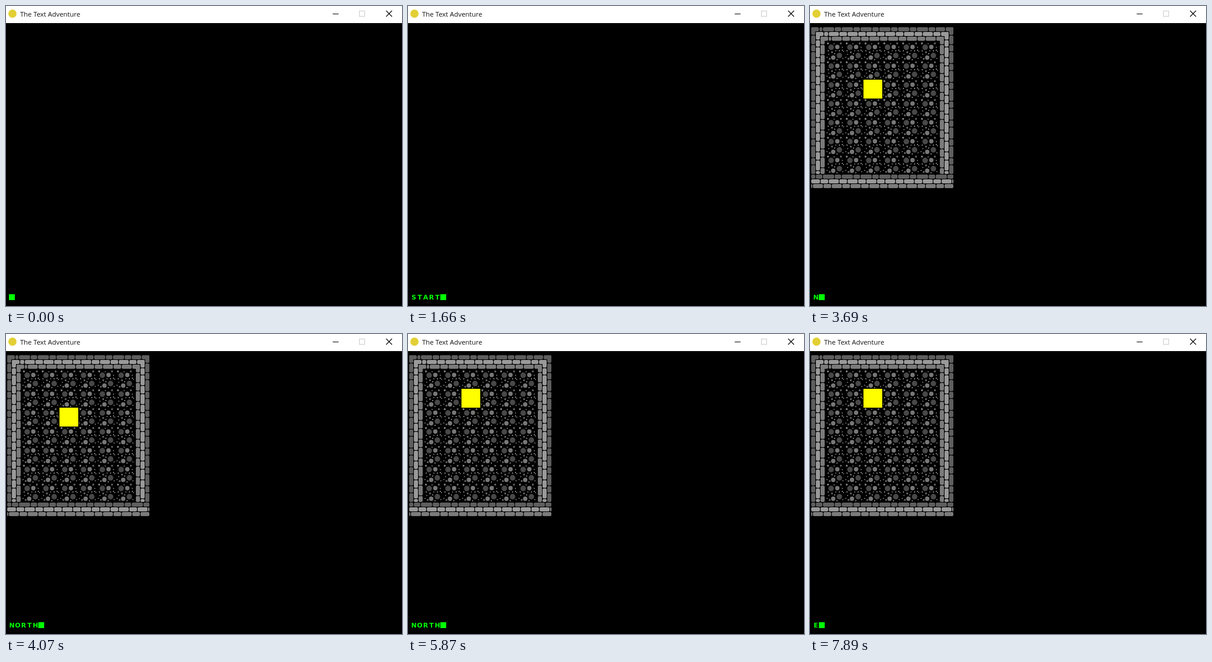
Write an HTML page that moves like this. It is 674 px wide and 509 px high and loops after 8 s.

```html
<!DOCTYPE html>
<html lang="en">
<head>
<meta charset="utf-8">
<title>The Text Adventure</title>
<style>
  html, body { margin: 0; width: 100%; height: 100%; overflow: hidden; background: #000; }
  svg { display: block; width: 674px; height: 509px; }
  .title { font: 11.4px "Open Sans", "Noto Sans", sans-serif; fill: #111; }
  .prompt { font: bold 11px "DejaVu Sans", sans-serif; fill: #0f0; text-anchor: middle; }
</style>
</head>
<body>
<svg viewBox="0 0 674 509">
  <defs>
    <pattern id="floor" x="27" y="61" width="32" height="32" patternUnits="userSpaceOnUse">
      <g id="pebbles"></g>
    </pattern>
  </defs>

  <rect width="674" height="509"/>
  <rect width="674" height="29" fill="#fff"/>
  <circle cx="11" cy="13" r="7" fill="#e3cf35"/>
  <text class="title" x="24" y="18">The Text Adventure</text>
  <g fill="none" stroke="#000">
    <path d="M556 13.5h10"/>
    <rect x="601.5" y="8.5" width="9" height="9" stroke="#ccc"/>
    <path d="M647 8l10 10M657 8l-10 10" stroke-width="1.1"/>
  </g>

  <g id="room" visibility="hidden">
    <rect x="27" y="61" width="192" height="224" fill="url(#floor)"/>
    <g id="walls"></g>
    <rect id="player" x="91" y="125" width="32" height="32" fill="#ff0" shape-rendering="crispEdges"/>
  </g>

  <text id="prompt" class="prompt" x="10 20 30 40 50" y="498"></text>
  <rect id="cursor" x="5" y="489" width="10" height="10" fill="#0f0" shape-rendering="crispEdges"/>
</svg>

<script>
const LOOP = 8000, TILE = 32, CELL = 10;
const ROOM = { left: 2, right: 244, top: 36, floorX: 27, floorY: 61, bottom: 285 };
const CORNER = 14;

function add(parent, tag, attrs) {
  const el = document.createElementNS('http://www.w3.org/2000/svg', tag);
  for (const key in attrs) el.setAttribute(key, attrs[key]);
  document.getElementById(parent).append(el);
}

function brick(x, y, width, height, fill) {
  add('walls', 'rect', { x, y, width, height, rx: 2, fill });
}

// Each tile of a course holds one short and one long brick, cut off at the ends.
function course(from, to, phase, short, place) {
  let at = phase - TILE * Math.ceil((phase - from) / TILE + 1);
  for (let isShort = true; at < to; isShort = !isShort) {
    const next = at + (isShort ? short : TILE - short);
    const start = Math.max(at, from);
    const size = Math.min(next - 1, to) - start;
    if (size > 1) place(start, size);
    at = next;
  }
}

// Courses from the outside in; phase is where the short brick starts in a tile.
const courses = [
  { fill: '#5e5e5e', phase: 15, short: 12 },
  { fill: '#999', phase: 23, short: 14 },
  { fill: '#7b7b7b', phase: 28, short: 14 }
];

courses.forEach(({ fill, phase, short }, i) => {
  const inset = 8 * i;
  const left = ROOM.left + inset, right = ROOM.right - inset, top = ROOM.top + inset;
  const base = ROOM.bottom + 1 + inset;
  const across = ROOM.floorX + phase;
  const down = ROOM.floorY + TILE - phase - short;

  course(left + CORNER, right - CORNER, across, short, (x, size) => brick(x, top, size, 7, fill));
  course(ROOM.left, ROOM.right, across, short, (x, size) => brick(x, base, size, 7, fill));
  course(top + CORNER, ROOM.bottom, down, short, (y, size) => {
    brick(left, y, 7, size, fill);
    brick(right - 7, y, 7, size, fill);
  });

  const arm = CORNER - 1;
  brick(left, top, arm, 7, fill);
  brick(left, top, 7, arm, fill);
  brick(right - arm, top, arm, 7, fill);
  brick(right - 7, top, 7, arm, fill);
});

// Stones of one floor tile: [x, y, radius, colour].
const stones = [[9, 9, 4.7, '#484848'], [23, 23, 4.7, '#484848'],
                [19.5, 8.5, 3.7, '#777'], [12.5, 26.5, 3.7, '#777']];
for (const [cx, cy, r, fill] of stones) add('pebbles', 'circle', { cx, cy, r, fill });

// Grit between the stones: [x, y, size].
const grit = [[2, 1, 3], [24, 1, 3], [27, 8, 2], [3, 14, 2], [9, 16, 3], [16, 14, 2],
              [14, 19, 2], [4, 20, 2], [29, 15, 2], [27, 13, 2], [5, 27, 3], [1, 25, 2],
              [18, 29, 2], [28, 27, 2], [13, 2, 2], [22, 14, 2]];
grit.forEach(([x, y, size], i) => add('pebbles', 'rect', {
  x, y, width: size, height: size, fill: i % 3 ? '#5a5a5a' : '#777'
}));

// [time, prompt text, player's row]; no row means the room is not shown yet.
const timeline = [[0, '', null]];
function type(word, times, row) {
  times.forEach((time, i) => {
    timeline.push([time, word.slice(0, word.length - times.length + i + 1), row]);
  });
}
type('START', [1300, 1390, 1480, 1570, 1660], null);
timeline.push([2250, '', 2]);
type('NORTH', [3690, 3775, 3860, 4010, 4070], 2);
timeline.push([4470, '', 1]);
type('NORTH', [5090, 5630, 5800, 5870], 1);
timeline.push([6110, '', 0]);
type('SOUTH', [6570, 6643, 6715, 6788, 6860], 0);
timeline.push([7080, '', 1]);
type('E', [7890], 1);

const [room, player, prompt, cursor] =
  ['room', 'player', 'prompt', 'cursor'].map(id => document.getElementById(id));
const origin = performance.now();

function draw() {
  const now = (performance.now() - origin) % LOOP;
  const [, text, row] = timeline.findLast(([time]) => time <= now);
  prompt.textContent = text;
  cursor.setAttribute('x', 5 + CELL * text.length);
  room.setAttribute('visibility', row === null ? 'hidden' : 'visible');
  player.setAttribute('y', ROOM.floorY + TILE * (row ?? 2));
  requestAnimationFrame(draw);
}
draw();
</script>
</body>
</html>
```
